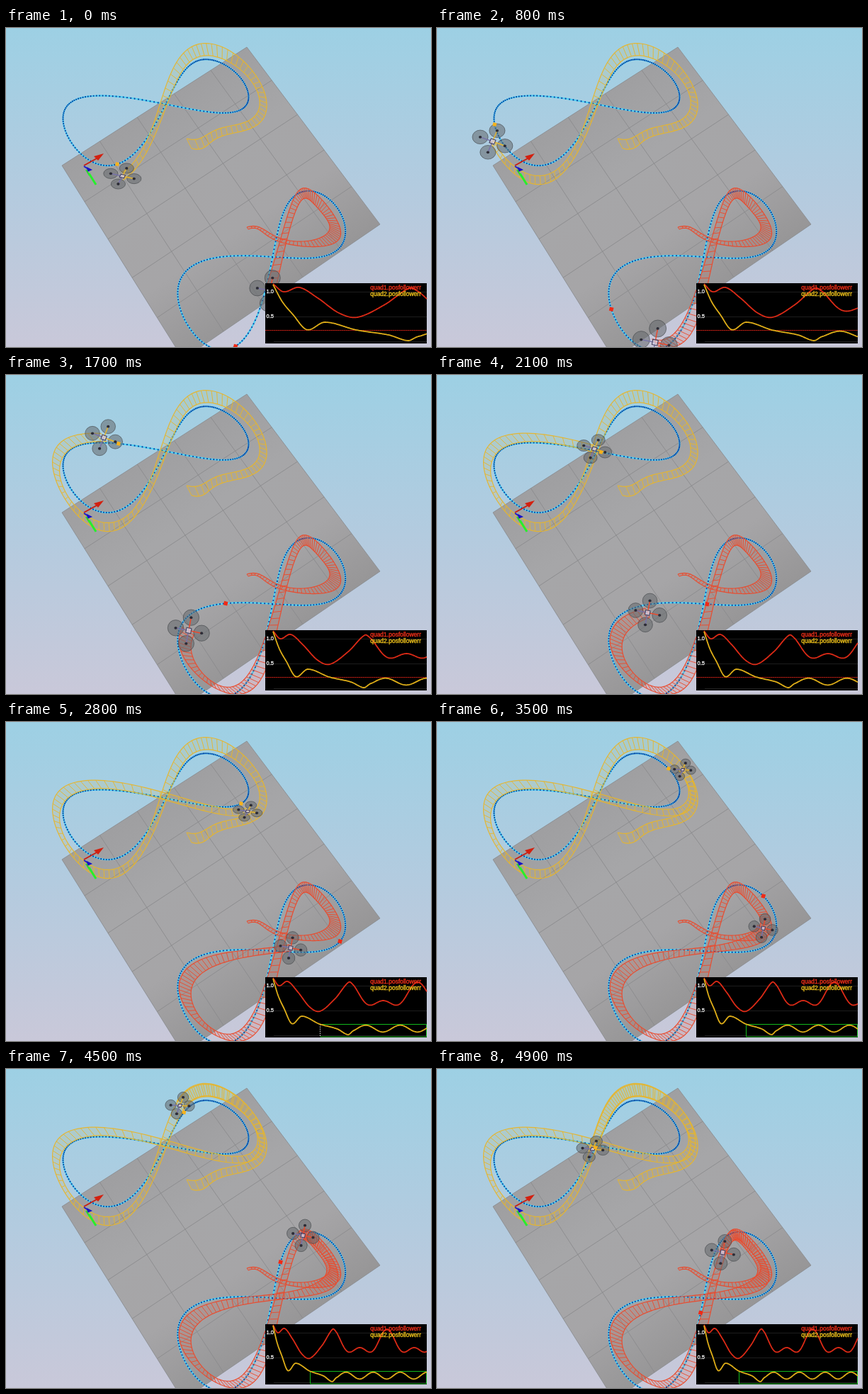
Animation of 600 by 450 pixels, one loop 5 s. Source, as an HTML page with a canvas:

```html
<!DOCTYPE html>
<html lang="en">
<head>
<meta charset="utf-8">
<title>Two quadrotors following figure-eight paths</title>
<style>
html, body { margin: 0; width: 100%; height: 100%; overflow: hidden; background: #b4ccdf; }
canvas { display: block; width: 600px; height: 450px; }
</style>
</head>
<body>
<canvas id="stage" width="600" height="450"></canvas>
<script>
const ctx = document.getElementById('stage').getContext('2d');
const TAU = Math.PI * 2;
const STEP = 100, STEPS = 50;
const LAP = 55.5;     // steps per figure eight
const HISTORY = 35;   // steps already flown when the loop starts
const FRESH = 25;     // step at which the tolerance box appears

// Each loop is given by eight points at equal times around one lap.
const yellow = {
  color: '#e6b62e', rung: 0.6, target: '#f5b21c', ball: 5,
  path: [[157, 192], [85, 148], [113, 97], [228, 108], [330, 116], [329, 68], [275, 45], [227, 104]],
  edges: [
    { start: [255, 156], loop: [[165, 214], [84, 176], [84, 90], [218, 98], [336, 122], [345, 73], [278, 38], [227, 107]] },
    { start: [262, 170], loop: [[163, 203], [88, 172], [96, 101], [218, 108], [341, 131], [353, 68], [273, 21], [218, 103]] }
  ],
  settle: 3, arm: 15, turn: 0.17, bank: 0.15
};
const red = {
  color: '#ea4a2d', rung: 0.48, target: '#f02a16', ball: 5.5,
  path: [[324, 449], [252, 411], [266, 334], [378, 323], [470, 311], [463, 248], [406, 238], [374, 335]],
  edges: [
    { start: [340, 281], loop: [[379, 372], [325, 451], [247, 391], [291, 330], [397, 315], [452, 288], [434, 252], [409, 256]] },
    { start: [342, 284], loop: [[365, 371], [313, 441], [262, 394], [298, 343], [399, 324], [468, 298], [437, 238], [401, 252]] }
  ],
  settle: 4.5, arm: 16.5, turn: 0, bank: 0
};

// Smooth periodic curve through equally timed points (trigonometric interpolation).
function orbit(pts, t) {
  const n = pts.length;
  let x = 0, y = 0;
  pts.forEach(([px, py], k) => {
    const a = TAU * (t / LAP - k / n), half = Math.tan(a / 2);
    const w = Math.abs(half) < 1e-6 ? 1 : Math.sin(n * a / 2) / (n * half);
    x += w * px;
    y += w * py;
  });
  return [x, y];
}

// A ribbon edge begins at its start point and settles onto its loop.
function edgeAt({ start, loop }, settle, t) {
  const s = (t + HISTORY) / settle, w = 1 / (1 + s * s);
  const from = orbit(loop, -HISTORY);
  return orbit(loop, t).map((v, i) => v + w * (start[i] - from[i]));
}

const ribbonAt = (q, t) => q.edges.map(e => edgeAt(e, q.settle, t));

function spline(pts, at) {
  let i = 0;
  while (i < pts.length - 2 && pts[i + 1][0] <= at) i++;
  const [x0, y0] = pts[i], [x1, y1] = pts[i + 1];
  const slope = k => {
    const a = pts[Math.max(0, k - 1)], b = pts[Math.min(pts.length - 1, k + 1)];
    return (b[1] - a[1]) / (b[0] - a[0]);
  };
  const d = x1 - x0, f = (at - x0) / d, g = 1 - f;
  return g * g * ((1 + 2 * f) * y0 + f * d * slope(i)) + f * f * ((3 - 2 * f) * y1 - g * d * slope(i + 1));
}

// Plot heights: a few points for the start-up, then a steady wave.
function errorCurve(keys, wave) {
  const pts = [...keys];
  for (let s = keys[keys.length - 1][0] + 2; s < 90; s++) pts.push([s, wave(s)]);
  return s => spline(pts, s);
}
const errRed = errorCurve([[0, 361], [2.4, 372], [6, 366], [10.2, 381], [15, 402], [19.2, 408], [25.5, 390], [31, 367]], s => {
  const a = TAU * (s - 31) / 28.3;
  return 388.5 - 13 * Math.cos(a) - 8.5 * Math.cos(2 * a);
});
const errYellow = errorCurve([[0, 362], [2.1, 386], [4.5, 404], [7.7, 425.5], [11.8, 415], [19, 426], [26.3, 433], [30.7, 441]],
  s => 432.5 - 4.8 * Math.cos(TAU * (s - 38) / 14.1));

function trace(pts, close) {
  ctx.beginPath();
  pts.forEach(([x, y]) => ctx.lineTo(x, y));
  if (close) ctx.closePath();
}

function line(pts, color, width, close) {
  trace(pts, close);
  ctx.strokeStyle = color;
  ctx.lineWidth = width;
  ctx.stroke();
}

function fill(pts, color) {
  trace(pts);
  ctx.fillStyle = color;
  ctx.fill();
}

function disc(x, y, rx, ry, color, edge) {
  ctx.beginPath();
  ctx.ellipse(x, y, rx, ry, 0, 0, TAU);
  ctx.fillStyle = color;
  ctx.fill();
  if (edge) {
    ctx.strokeStyle = edge;
    ctx.lineWidth = 0.8;
    ctx.stroke();
  }
}

function gradient(x1, y1, x2, y2, stops) {
  const g = ctx.createLinearGradient(x1, y1, x2, y2);
  stops.forEach((c, i) => g.addColorStop(i / (stops.length - 1), c));
  return g;
}

// Projective map from the unit square to the floor corners.
const floor = (() => {
  const [x0, y0, x1, y1, x2, y2, x3, y3] = [79, 194, 340, 27, 528, 277, 250, 467];
  const dx1 = x1 - x2, dx2 = x3 - x2, sx = x0 - x1 + x2 - x3;
  const dy1 = y1 - y2, dy2 = y3 - y2, sy = y0 - y1 + y2 - y3;
  const det = dx1 * dy2 - dx2 * dy1;
  const g = (sx * dy2 - dx2 * sy) / det, h = (dx1 * sy - sx * dy1) / det;
  return (u, v) => {
    const w = g * u + h * v + 1;
    return [((x1 - x0 + g * x1) * u + (x3 - x0 + h * x3) * v + x0) / w,
      ((y1 - y0 + g * y1) * u + (y3 - y0 + h * y3) * v + y0) / w];
  };
})();

function drawScene() {
  ctx.fillStyle = gradient(0, 0, 0, 450, ['#9dd0e4', '#b3cbdf', '#c9c8d9']);
  ctx.fillRect(0, 0, 600, 450);
  const corners = [floor(0, 0), floor(1, 0), floor(1, 1), floor(0, 1)];
  fill(corners, gradient(210, 110, 389, 372, ['#9f9fa1', '#a6a6a8', '#a6a5a7', '#979697']));
  for (let i = 1; i < 5; i++) {
    line([floor(i / 5, 0), floor(i / 5, 1)], '#8b8b8d', 0.9);
    line([floor(0, i / 5), floor(1, i / 5)], '#8b8b8d', 0.9);
  }
  line(corners, '#8b8d90', 0.9, true);
}

// Dots are spaced evenly in time, so they crowd where the path is slow.
function drawPath(path) {
  const pts = [];
  for (let t = 0; t < LAP; t += 0.3) pts.push(orbit(path, t));
  line(pts, '#4fd0f2', 2.3, true);
  for (const [x, y] of pts) disc(x, y, 1.05, 1.05, '#0b3c9e');
}

function drawAxes() {
  line([[110, 194], [128, 184]], '#c81e12', 2);
  fill([[138, 177], [130, 187], [124, 181]], '#d3200f');
  line([[110, 195], [116, 199]], '#1a1ad0', 2);
  fill([[122, 200], [115, 203], [114, 196]], '#1412c8');
  line([[113, 200], [118, 208]], '#2bd52b', 2);
  line([[117, 205], [127, 221]], '#25f02a', 3);
}

function drawRibbon(q, now) {
  const pairs = [];
  for (let t = -HISTORY; t < now; t += q.rung / 2) pairs.push(ribbonAt(q, t));
  pairs.push(ribbonAt(q, now));
  const a = pairs.map(p => p[0]), b = pairs.map(p => p[1]);
  ctx.globalAlpha = 0.12;
  for (let i = 1; i < a.length; i++) fill([a[i - 1], a[i], b[i], b[i - 1]], q.color);
  ctx.globalAlpha = 0.95;
  line(a, q.color, 1.2);
  line(b, q.color, 1.2);
  pairs.forEach((p, i) => { if (i % 2 === 0) line(p, q.color, 0.95); });
  ctx.globalAlpha = 1;
}

function drawTarget(q, t) {
  ctx.save();
  ctx.translate(...orbit(q.path, t));
  ctx.rotate(0.25);
  ctx.fillStyle = q.target;
  ctx.fillRect(-q.ball / 2, -q.ball / 2, q.ball, q.ball);
  ctx.restore();
}

function drawQuad(q, t) {
  const [a, b] = ribbonAt(q, t);
  const x = (a[0] + b[0]) / 2, y = (a[1] + b[1]) / 2;
  const wave = (shift, k = 1) => Math.cos(k * TAU * (t - shift) / LAP);
  const arm = q.arm + 3.5 * wave(9);
  const flat = 1 - q.bank + q.bank * wave(14, 2);
  const yaw = 0.2 + q.turn * wave(13), lean = -1.38 + q.turn;
  const ux = arm * Math.cos(yaw), uy = arm * Math.sin(yaw);
  const vx = arm * Math.cos(lean), vy = arm * Math.sin(lean) * flat;
  const rx = arm * 0.6, ry = rx * flat;
  const arms = [[-ux, -uy, '#7772a8'], [-vx, -vy, '#7772a8'], [ux, uy, q.color], [vx, vy, q.color]];
  for (const [dx, dy, color] of arms) {
    disc(x + dx, y + dy, rx, ry, 'rgba(100,103,107,0.55)', 'rgba(65,67,71,0.75)');
    line([[x, y], [x + dx, y + dy]], color, 1.5);
    disc(x + dx, y + dy, 2.1, 1.9, '#2c2c36');
  }
  const k = 0.19;
  const body = [[ux + vx, uy + vy], [ux - vx, uy - vy], [-ux - vx, -uy - vy], [vx - ux, vy - uy]]
    .map(([dx, dy]) => [x + dx * k, y + dy * k]);
  fill(body, 'rgba(215,210,225,0.75)');
  line(body, '#45405f', 1.1, true);
}

function drawCurve(height, color, span) {
  const pts = [];
  for (let x = 377; x <= 594; x++) pts.push([x, height((x - 377) / 217 * span)]);
  line(pts, color, 1.8);
}

function label(text, x, y, size, align, color) {
  ctx.font = `${size}px "Liberation Sans", Arial, sans-serif`;
  ctx.textAlign = align;
  ctx.fillStyle = ctx.strokeStyle = color;
  ctx.lineWidth = 0.35;
  ctx.fillText(text, x, y);
  ctx.strokeText(text, x, y);
}

function drawPlot(step) {
  const span = HISTORY + step;
  ctx.fillStyle = '#000';
  ctx.fillRect(366, 360, 228, 85);
  [372.5, 407.5, 442.5].forEach(y => line([[378, y], [594, y]], '#1d1d1d', 1));
  if (step < FRESH) {
    line([[366, 426.5], [594, 426.5]], '#7c120c', 1);
    ctx.setLineDash([2, 1]);
    line([[366, 426.5], [594, 426.5]], '#b01c12', 1);
  } else {
    const x = Math.round(377 + 217 * 19.1 / span) + 0.5;
    line([[x, 426.5], [593.5, 426.5], [593.5, 444], [x, 444]], '#12b81c', 1);
    const dotted = step < FRESH + 6;
    if (dotted) ctx.setLineDash([1.5, 1.5]);
    line([[x, 426.5], [x, 444]], dotted ? '#e0e0e0' : '#12b81c', 1);
  }
  ctx.setLineDash([]);
  drawCurve(errRed, '#dc2a16', span);
  drawCurve(errYellow, '#dfae18', span);
  label('quad1.posfollowerr', 586, 369.3, 8.5, 'right', '#f0301a');
  label('quad2.posfollowerr', 586, 378.3, 8.5, 'right', '#f2c41c');
  label('1.0', 367.5, 373.5, 7.5, 'left', '#eee');
  label('0.5', 367.5, 408.8, 7.5, 'left', '#eee');
}

function draw(step) {
  ctx.lineJoin = 'round';
  drawScene();
  for (const q of [yellow, red]) {
    drawPath(q.path);
    drawRibbon(q, step);
  }
  drawAxes();
  for (const q of [yellow, red]) {
    drawQuad(q, step);
    drawTarget(q, step);
  }
  drawPlot(step);
}

const start = performance.now();
let shown = -1;
function tick() {
  const step = Math.floor(Math.max(0, performance.now() - start) / STEP) % STEPS;
  if (step !== shown) draw(shown = step);
  requestAnimationFrame(tick);
}
tick();
</script>
</body>
</html>
```
